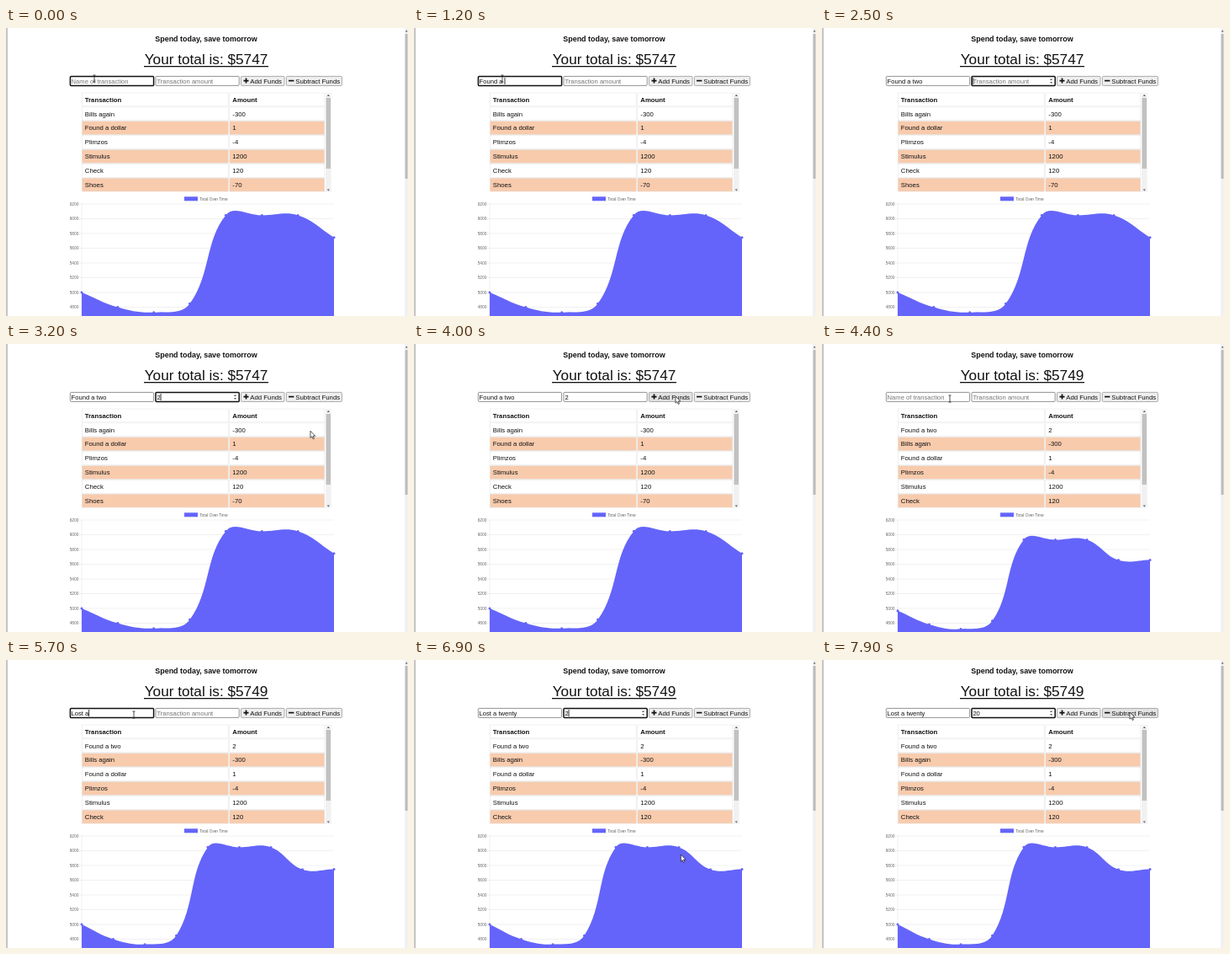
An HTML page for the animation above (8 s loop, 478 px wide and 342 px high).

```html
<!DOCTYPE html>
<html lang="en">
<head>
<meta charset="utf-8">
<title>Budget tracker</title>
<style>
html, body { margin: 0; width: 100%; height: 100%; overflow: hidden; background: #fff; }
svg { display: block; width: 100vw; height: 100vh; font-family: "Liberation Sans", Arial, sans-serif; }
text { white-space: pre; fill: #111; }
.cell { font-size: 7.75px; }
.head { font-weight: bold; }
.field text { font-size: 7.6px; }
.field rect { fill: #fff; stroke: #767676; stroke-width: .8; }
.field.focus rect { stroke: #101010; stroke-width: 1.5; }
.field.empty text { fill: #757575; }
.button rect { fill: #efefef; stroke: #8a8a8a; stroke-width: .7; }
.button.hover rect { fill: #e2e2e2; }
.button text { font-size: 7.8px; }
.tick { font-size: 4.8px; fill: #666; }
.grid { stroke: #000; stroke-opacity: .1; stroke-width: .6; }
.blue { fill: #6464fa; }
</style>
</head>
<body>
<svg viewBox="0 0 478 342">
  <rect width="2.2" height="342" fill="#c6c6c6"/>
  <rect x="474" width="4" height="342" fill="#f1f1f1"/>
  <rect x="474.6" y="7" width="3" height="172" fill="#bcbcbc"/>
  <path d="M474.8 4.5l1.4-2 1.4 2z" fill="#555"/>

  <text x="238" y="16" font-size="8.95" font-weight="bold" text-anchor="middle">Spend today, save tomorrow</text>
  <text id="total" x="238" y="43.2" font-size="17.2" text-anchor="middle"></text>
  <rect x="164" y="45" width="148" height="1.3" fill="#111"/>

  <g id="name" class="field"><rect x="76.4" y="57.4" width="99.2" height="11" rx="1"/><text x="77.6" y="65.6"></text></g>
  <g id="amount" class="field"><rect x="178" y="57.4" width="99.2" height="11" rx="1"/><text x="179.4" y="65.6"></text></g>
  <path id="spin" d="M271 62l1.5-2 1.5 2zM271 64l1.5 2 1.5-2z" fill="#555"/>
  <rect id="caret" y="59" width=".8" height="8" fill="#000"/>

  <g id="add" class="button">
    <rect x="279.4" y="57.4" width="51.6" height="11" rx="1"/>
    <path d="M282.5 62.6h6M285.5 59.6v6" stroke="#111" stroke-width="1.7"/>
    <text x="290.3" y="65.5">Add Funds</text>
  </g>
  <g id="subtract" class="button">
    <rect x="333.4" y="57.4" width="66" height="11" rx="1"/>
    <path d="M336 62.6h6.4" stroke="#111" stroke-width="1.7"/>
    <text x="344.3" y="65.5">Subtract Funds</text>
  </g>

  <g id="table"></g>
  <rect x="380" y="77" width="6.6" height="118" fill="#f1f1f1"/>
  <rect x="380.6" y="83" width="5.4" height="84" fill="#c1c1c1"/>
  <path d="M381.8 81l1.5-2 1.5 2zM381.8 191.5l1.5 2 1.5-2z" fill="#555"/>

  <rect class="blue" x="212" y="200.3" width="16" height="5"/>
  <text class="tick" x="230.2" y="204.5">Total Over Time</text>
  <g id="axes"></g>
  <path id="area" class="blue"/>
  <g id="dots" class="blue"></g>

  <path id="ibeam" d="M-1.5-4h3M-1.5 4h3M0-4v8" stroke="#222" stroke-width=".8"/>
  <path id="arrow" d="M0 0v8.2l1.9-1.7 1.3 3 1.3-.6-1.3-2.9h2.6z" fill="#fff" stroke="#111" stroke-width=".7"/>
</svg>
<script>
const LOOP = 8000, STEP = 100, POSTED = 4010, RISE = 830;
const LEFT = 90, RIGHT = 390, BASE = 349;
const $ = id => document.getElementById(id);

const rows = [['Found a two', 2], ['Bills again', -300], ['Found a dollar', 1], ['Plimzos', -4],
  ['Stimulus', 1200], ['Check', 120], ['Shoes', -70]];
const totals = [5000, 4800, 4730, 4850, 6050, 6046, 6047, 5747, 5749];

// Timelines: [time, value], each value holds until the next.
const keys = (before, text, start, step) =>
  [...text].map((_, i) => [start + i * step, before + text.slice(0, i + 1)]);
const typed = {
  name: [[-600, ''], ...keys('', 'Found', 300, 150), ...keys('Found', ' a ', 1000, 100),
    ...keys('Found a ', 'two', 1600, 100), [POSTED, ''],
    ...keys('', 'Lost a', 5300, 80), ...keys('Lost a', ' twenty', 5800, 100)],
  amount: [[-600, ''], [2700, '2'], [POSTED, ''], [6900, '2'], [7100, '20']]
};
const focus = [[-600, 'name'], [2200, 'amount'], [3700, ''], [4700, 'name'], [6700, 'amount']];
const hints = { name: 'Name of transaction', amount: 'Transaction amount' };
const pointer = [[0, 105, 60], [1800, 105, 60], [1900, 114, 73], [2200, 114, 73], [2500, 412, 122],
  [2900, 395, 130], [3600, 311, 62], [4000, 311, 62], [4400, 152, 65], [6400, 152, 65],
  [6500, 264, 214], [6700, 264, 214], [7000, 336, 237], [7400, 336, 237], [7800, 366, 62], [LOOP, 366, 62]];

const last = (list, t) => list.filter(e => e[0] <= t).pop();
const show = (id, on) => $(id).setAttribute('visibility', on ? 'visible' : 'hidden');
const valueY = v => 314 - (v - 5000) * .0875;

function cells(y, pair, kind, fill) {
  return pair.map((text, i) => {
    const x = i ? 265.8 : 90.3, w = i ? 113 : 174;
    return `<rect x="${x}" y="${y}" width="${w}" height="15.9" fill="${fill}" stroke="#e2e2e2" stroke-width=".5"/>
      <text class="cell ${kind}" x="${x + 3.5}" y="${y + 10.7}">${text}</text>`;
  }).join('');
}

function drawTable(posted) {
  const list = rows.slice(posted ? 0 : 1, posted ? 6 : 7);
  $('table').innerHTML = cells(77, ['Transaction', 'Amount'], 'head', '#fff') +
    list.map((r, i) => cells(77 + 16.87 * (i + 1), r, '', i % 2 ? '#f8cbad' : '#fff')).join('');
}

function drawAxes() {
  let out = `<path class="grid" d="M${LEFT} 209V342"/>`;
  for (let v = 6200; v >= 4800; v -= 200) {
    const y = valueY(v);
    out += `<path class="grid" d="M87 ${y}H${RIGHT}"/>
      <text class="tick" x="86.3" y="${y + 1.7}" text-anchor="end">${v}</text>`;
  }
  $('axes').innerHTML = out;
}

// Smooth line: each point's handles follow the chord of its neighbours.
function drawChart(values, fall) {
  const gap = (RIGHT - LEFT) / (values.length - 1);
  const pts = values.map((v, i) => {
    const y = valueY(v);
    return { x: LEFT + i * gap, y: y + (BASE - y) * fall };
  });
  const dist = (a, b) => Math.hypot(a.x - b.x, a.y - b.y);
  const handles = pts.map((p, i) => {
    const a = pts[i - 1] || p, b = pts[i + 1] || p;
    const before = dist(a, p), after = dist(p, b), k = .4 / (before + after);
    const handle = f => `${p.x + f * (b.x - a.x)} ${p.y + f * (b.y - a.y)}`;
    return { in: handle(-k * before), out: handle(k * after) };
  });
  const curve = pts.slice(1).map((p, i) =>
    `C${handles[i].out} ${handles[i + 1].in} ${p.x} ${p.y}`).join('');
  $('area').setAttribute('d', `M${LEFT} ${pts[0].y}${curve}V${BASE}H${LEFT}z`);
  $('dots').innerHTML = pts.map(p => `<circle cx="${p.x}" cy="${p.y}" r="1.5"/>`).join('');
}

function drawFields(t) {
  const [since, active] = last(focus, t);
  for (const id in typed) {
    const [key, value] = last(typed[id], t);
    const field = $(id), text = field.querySelector('text');
    text.textContent = value || hints[id];
    field.classList.toggle('empty', !value);
    field.classList.toggle('focus', id === active);
    if (id === active) {
      const width = value ? text.getComputedTextLength() : 0;
      $('caret').setAttribute('x', +text.getAttribute('x') + width);
      show('caret', (t - Math.max(since, key)) % 1060 < 530);
    }
  }
  if (!active) show('caret', false);
  show('spin', active === 'amount');
}

function drawPointer(t) {
  const i = pointer.findIndex(p => p[0] > t);
  const [t0, x0, y0] = pointer[i - 1], [t1, x1, y1] = pointer[i];
  const p = (t - t0) / (t1 - t0), e = p * p * (3 - 2 * p);
  const x = x0 + (x1 - x0) * e, y = y0 + (y1 - y0) * e;
  const inRow = y > 57 && y < 69, overField = inRow && x > 76 && x < 277;
  const visible = t < 2450 || t >= 2900;
  for (const id of ['ibeam', 'arrow']) {
    $(id).setAttribute('transform', `translate(${x} ${y})`);
    show(id, visible && overField === (id === 'ibeam'));
  }
  $('add').classList.toggle('hover', inRow && x > 279 && x < 331);
  $('subtract').classList.toggle('hover', inRow && x > 333 && x < 400);
}

let shown = -1;
function draw() {
  const t = Math.floor(performance.now() % LOOP / STEP) * STEP;
  if (t !== shown) {
    shown = t;
    const posted = t >= POSTED;
    const left = posted ? Math.max(0, 1 - (t - POSTED) / RISE) : 0;
    $('total').textContent = 'Your total is: $' + totals[posted ? 8 : 7];
    drawTable(posted);
    drawChart(posted ? totals : totals.slice(0, 8), left ** 4);
    drawFields(t);
    drawPointer(t);
  }
  requestAnimationFrame(draw);
}

drawAxes();
draw();
</script>
</body>
</html>
```
